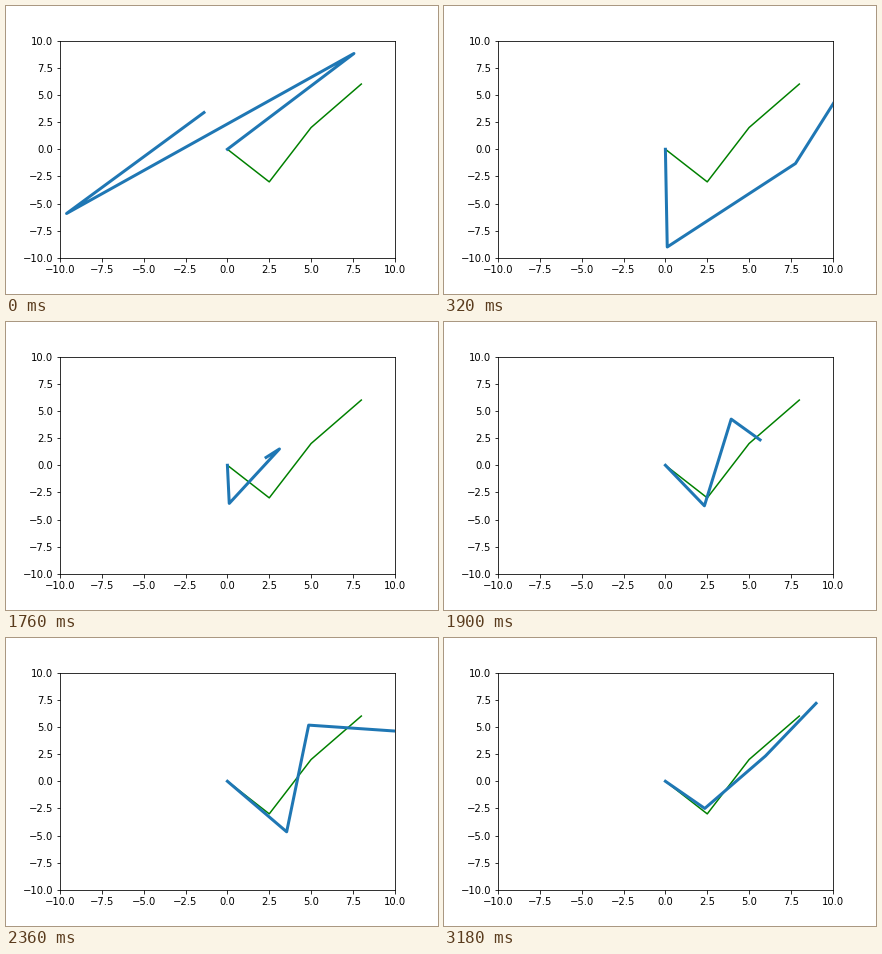
Recreate the animation shown at these times as a matplotlib script. Size 432 by 288 pixels, loop 3980 ms.

```python
import matplotlib.pyplot as plt
import numpy as np
from matplotlib.animation import FuncAnimation

STEP, LOOP = 20, 3980
LIMIT = 10

goal = np.array([(0, 0), (2.5, -3), (5, 2), (8, 6)])

# Times in ms at which a better guess replaces the last one.
starts = [0, 20, 320, 1080, 1760, 1800, 1880, 1940, 2080, 2360, 2720, 2960, 3180]

# Key guesses by their place in the search: x1, y1, x2, y2, x3, y3.
keys = {
    0: (7.56, 8.81, -9.61, -5.91, -1.4, 3.38),
    2: (0.11, -8.99, 7.77, -1.31, 11, 6.57),
    3: (0.51, 2.74, 1.71, -1.52, 11, 6.6),
    4: (0.11, -3.51, 3.11, 1.5, 2.31, 0.72),
    8: (4.55, -3.95, 4.75, 6.99, 9, 3.95),
    10: (2.53, -5.35, 4.96, 3.34, 11, 5.29),
    12: (2.35, -2.5, 5.98, 2.33, 9, 7.17),
}


def guess(place):
    """Polyline from the origin, blended between the nearest key guesses."""
    joints = [np.interp(place, list(keys), track) for track in zip(*keys.values())]
    return np.array([0, 0, *joints]).reshape(-1, 2)


plt.rcParams.update({"font.family": "DejaVu Sans", "font.size": 10})
fig = plt.figure(figsize=(6, 4), dpi=72, facecolor="white")
fig.subplots_adjust(left=0.125, right=0.9, bottom=0.1251, top=0.88)
ax = fig.add_subplot()
ticks = np.arange(-LIMIT, LIMIT + 1, 2.5)
ax.set(xlim=(-LIMIT, LIMIT), ylim=(-LIMIT, LIMIT), xticks=ticks, yticks=ticks)

ax.plot(*goal.T, color="g", lw=1.5)
guess_line, = ax.plot([], [], color="#1f77b4", lw=3)


def update(frame):
    place = np.searchsorted(starts, frame * STEP, side="right") - 1
    guess_line.set_data(*guess(place).T)
    return guess_line,


anim = FuncAnimation(fig, update, frames=LOOP // STEP, interval=STEP,
                     repeat=True, repeat_delay=0)
plt.show()
```
